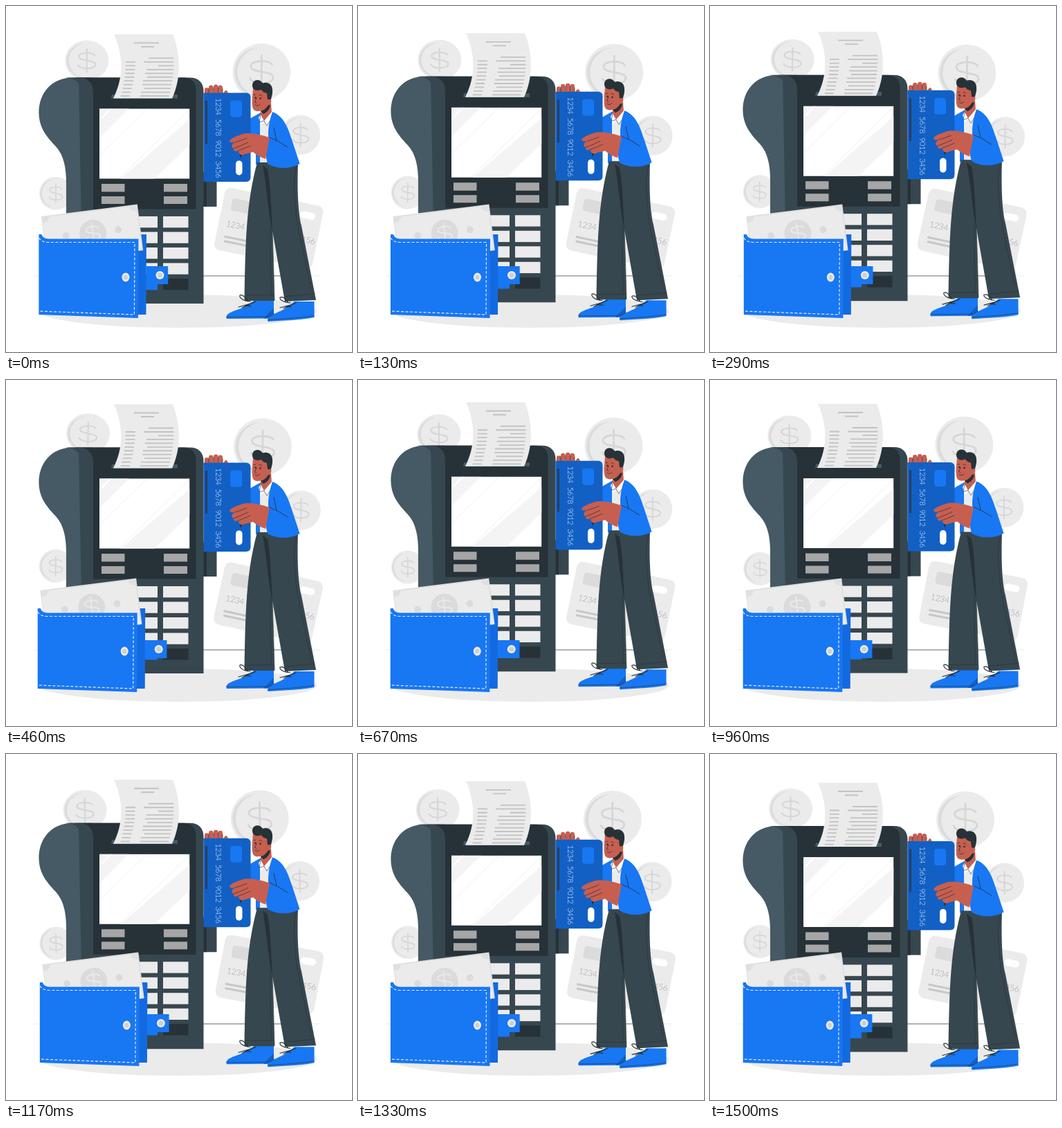
An HTML page that plays this animation: 500 px wide and 500 px high, repeating every 1.54 s.

```html
<!DOCTYPE html>
<html lang="en">
<head>
<meta charset="utf-8">
<title>Card payment</title>
<style>
  html, body { margin: 0; width: 100%; height: 100%; overflow: hidden; background: #fff; }
  svg { display: block; width: 100%; height: 100%; }
  text { font: 300 11px Lato, sans-serif; letter-spacing: -.3px; word-spacing: 3.2px; }
  .wide { font-size: 12px; letter-spacing: -.2px; word-spacing: 4.5px; }
  .pale { fill: #ebebeb; }
  .shade { fill: #dbdbdb; }
  .slate { fill: #37474f; }
  .dark { fill: #263238; }
  .blue { fill: #1877f2; }
  .deep { fill: #1260c4; }
  .skin { fill: #c75f50; }
  .ink { fill: none; stroke: #263238; stroke-linecap: round; stroke-linejoin: round; }
</style>
</head>
<body>
<svg viewBox="0 0 500 500">
  <defs>
    <path id="dollar" d="M11-7C10-13-11-13-11-6C-11 2 12-2 12 6C12 14-11 14-12 6M0-18V18" fill="none" stroke="#d6d6d6" stroke-width="2"/>
    <g id="coin">
      <circle r="30" class="pale"/>
      <path class="shade" d="M-2-26A26 26 0 0 0-2 26A26.2 26.2 0 0 1-2-26"/>
      <use href="#dollar"/>
    </g>
    <clipPath id="glass"><path d="M135 148.5H265.200V249.500H135Z"/></clipPath>
  </defs>

  <g id="backdrop">
    <use href="#coin" transform="translate(116.500 79) scale(1.05 .97)"/>
    <use href="#coin" transform="translate(369 95) scale(1.4 1.37)"/>
    <use href="#coin" transform="translate(425.500 186) scale(.95)"/>
    <use href="#coin" transform="translate(72 271) scale(.8)"/>
    <g transform="translate(318 261) rotate(11.500)">
      <rect width="145" height="92" rx="9" class="pale"/>
      <rect x="13" y="14" width="29" height="18" rx="4" class="shade"/>
      <rect x="113" y="12" width="22" height="10" rx="5" fill="#fff"/>
      <text x="11" y="56" class="wide" fill="#a0a0a0">1234 5678 9012 3456</text>
      <path d="M12 71H49M13 77.500H47" stroke="#c7c7c7" stroke-width="3"/>
    </g>
  </g>

  <path d="M40 390H455" stroke="#ebebeb"/>
  <path d="M285 390H440" stroke="#757575" stroke-width="1.200"/>
  <ellipse cx="249" cy="441" rx="200" ry="24" class="pale"/>

  <g id="scene">
    <!-- terminal -->
    <path class="slate" d="M285 240H304.500V290H285Z"/>
    <path class="dark" d="M285 240H290V290H285Z"/>
    <path fill="#455a64" d="M125 103.500H95C66 104 47 126 47.500 155C48 178 61 191 72 203C84 216 87 235 87 255V430H125Z"/>
    <path class="slate" d="M105 103.500H266C278 103.500 285.500 111 285.500 123V430H111Z"/>
    <path class="dark" d="M100 103.500H257C268 103.500 274.500 110 274.500 121V293.500H126V140Z"/>
    <path class="slate" d="M85 103.500C104 104 111 115 111 135V430H126V125C126 112 119 103.500 105 103.500Z"/>
    <g clip-path="url(#glass)">
      <path fill="#fff" d="M135 148H266V250H135Z"/>
      <path fill="#f4f4f4" d="M135 148H178L135 191ZM266 163V200L214 250H165Z"/>
      <path d="M152 148L134 166" stroke="#fff" stroke-width="2"/>
      <path d="M266 149L163 250M204 148L135 216" stroke="#ededed" stroke-width=".8"/>
    </g>
    <path fill="#a6a6a6" d="M138 257h33.500v11.500h-33.500zM138 275h33.500v11h-33.500zM228 257h34v11.500h-34zM228 275h34v11h-34z"/>
    <g id="keys"></g>
    <path fill="#455a64" d="M153 128H248V133.500H152Z"/>
    <path class="pale" d="M156 41H241C252 68 254 104 240 133.500H155C170 104 170 72 156 41Z"/>
    <path id="print" stroke="#c2c2c2" stroke-width="1.800"/>

    <!-- fingers behind the card -->
    <g class="skin">
      <rect x="287" y="118" width="6" height="14" rx="3"/>
      <rect x="293" y="114.500" width="6.500" height="16" rx="3.200"/>
      <rect x="300" y="113.500" width="6.500" height="16" rx="3.200"/>
      <rect x="306.500" y="114.500" width="6.500" height="16" rx="3.200"/>
      <path d="M312 128L317 122Q320 121 321 127Z"/>
    </g>
    <path class="ink" stroke-width=".7" d="M293 125V119M299.800 125V118M306.500 125V118M313 125V120"/>

    <!-- left sleeve, neck, shirt -->
    <path class="blue" d="M368 154L352 163V184L361 190V229H369Z"/>
    <path class="pale" d="M367 157L382 152L388 172L381 229H367Z"/>
    <path class="skin" d="M368 148L383 140L384 155L373 167L368 158Z"/>
    <path fill="#fafafa" d="M368 157L373 166L384 153L387 160L377 173L373 167L368 173L365 161Z"/>
    <path class="ink" stroke-width=".6" d="M368 157L366 168L373 166L377 173L386 159"/>

    <!-- head -->
    <path class="skin" d="M357 119C356 132 354 146 358 150C362 154 371 152 376 147L378 143C384 142 386 134 379 133L377 120Z"/>
    <path class="dark" d="M357 119C354 112 358 107 363 107C367 107 369 109 371 111.500C378 109 385 113 385 121C385.500 127 384 130 383 135L378 135L377 126Q371 125 369 121Q361 124 357 119Z"/>
    <path class="dark" d="M368 152Q375 150 379 143L382 143Q381 152 372 156Z"/>
    <circle cx="360.500" cy="132.500" r="1.300" class="dark"/>
    <circle cx="367.500" cy="133.500" r="1.300" class="dark"/>
    <path class="ink" stroke-width=".8" d="M358 128.500L361 128M366 128.500Q369 128 370 130M362 133L359.500 139L362 140M360 143Q364 146 367 142"/>

    <!-- trousers and shoes -->
    <path class="blue" d="M318.500 451C317 443 331 441 342 436L360 425H387V447Q386 451 376 451.500L319 452Z"/>
    <path class="deep" d="M372 451.500L387 436V447Q386 451 376 451.500Z"/>
    <path class="blue" d="M378 455C377 447 392 444 402 438L417 427H445.500V450Q430 453 402 454.500L379 456Z"/>
    <path class="ink" stroke-width=".6" d="M319 449.500L376 449Q384 449 387 444M379 453.500Q425 451 445 447.500"/>
    <path class="slate" d="M363 226H422C421 255 421 295 427 318L448 425L403 427L385 325L388 426L344.500 426C346 340 347 285 363 226Z"/>
    <path class="dark" d="M371 230L378 236C382 255 383 285 385 325C379 300 378 270 371 230Z"/>
    <path class="ink" stroke-width=".6" d="M385 325Q387 380 388 425M345 418H387M402 420L446 416M420 232C414 242 417 295 423 325L441 410M383 418L382 320"/>
    <path class="ink" stroke-width="1.200" d="M353 427C342 427 337 421 338 418C342 416 346 421 350 427M336 435L357 429M341 436L361 427M345 433L354 434M411 429C400 428 395 424 396 421C401 419 405 424 408 429M396 436L415 431M401 437L419 429M404 434L412 435"/>

    <!-- card -->
    <path class="deep" d="M285.500 125.500H347Q353.500 126 353.500 132V247.500Q353.500 254 347 254H285.500Z"/>
    <path fill="#263f63" d="M288 137H291V199H288Z"/>
    <rect x="324" y="136.500" width="17" height="24" rx="4" class="blue"/>
    <rect x="332" y="223.500" width="9.500" height="21" rx="4.700" fill="#fff"/>
    <text transform="translate(302.500 133.300) rotate(90)" fill="#e8eefc">1234 5678 9012 3456</text>
    <path class="dark" d="M337 211L342 213L339 220Z"/>

    <!-- jacket, right arm and hand -->
    <path class="blue" d="M385 153C402 159 408 178 413 193L424.500 228C410 236 392 236 378 228L376 220Q374 205 379 190Q378 172 385 153Z"/>
    <path class="skin" d="M381 190C368 186 352 182 342 185C332 188 323 192 323 195.500Q324 198 331 197C325 200 325 204 329 206C328 209 331 211 336 209C336 214 340 217 345 214L357 211Q365 218 375 221Z"/>
    <path class="ink" stroke-width=".7" d="M331 197Q341 194 348 191M329 206Q340 202 350 197M336 209Q345 206 353 202"/>
    <path class="ink" stroke-width=".8" d="M381 190Q394 195 407 204M387 176L391 194"/>
  </g>

  <g id="wallet">
    <path fill="#136ae0" d="M186 330H203.500L203 446H186Z"/>
    <path class="blue" d="M203 376H234.700V402H203Z"/>
    <circle cx="223" cy="389" r="6" class="pale"/>
    <circle cx="223" cy="389" r="3.500" fill="#cfcfcf"/>
    <g transform="translate(51.500 304) rotate(-7.200)">
      <path fill="#e0e0e0" d="M0 0H140V67H0Z"/>
      <path class="pale" d="M1 10Q10 10 11 2H128Q129 10 138 10V66H1Z"/>
      <circle cx="71" cy="33.500" r="19.500" class="shade"/>
      <circle cx="32" cy="32" r="5" class="shade"/>
      <circle cx="108" cy="33" r="5" class="shade"/>
      <use href="#dollar" transform="translate(71 33.500) scale(.85)" style="filter:brightness(1.100)"/>
    </g>
    <path class="blue" d="M48 330H52Q54 336 62 336.500H192L191.500 451L48 446Z"/>
    <path d="M48 335Q52 341.500 62 341.500H186.500L186 446L48 441" fill="none" stroke="#dfeafc" stroke-width="1.200" stroke-dasharray="4 2.500"/>
    <ellipse cx="173.500" cy="392" rx="5.500" ry="6.500" class="pale"/>
    <ellipse cx="173.500" cy="392" rx="3" ry="3.500" fill="#cfcfcf"/>
  </g>
</svg>
<script>
const $ = id => document.getElementById(id);

const key = (x, y, w, cls) => `<rect x="${x}" y="${y}" width="${w}" height="16.300" class="${cls}"/>`;
$('keys').innerHTML = [0, 1, 2, 3, 4].map(i => {
  const y = 304 + 22.500 * i, last = i === 4;
  return key(183, y, 36, last ? 'blue' : 'pale') + key(227, y, 36.500, last ? 'dark' : 'pale');
}).join('');

let print = 'M185 53.500H221M195 59H214M206 75.500H242';
[199, 220, 203, 201, 204, 198, 197, 200, 195, 194].forEach((start, i) => {
  const y = 81 + 5.450 * i, bend = i * i * .09;
  print += `M${173 - bend} ${y}h${14 - i * .1}M${start} ${y}H${242.500 - bend}`;
});
$('print').setAttribute('d', print);

const LOOP = 1540, LEAD = 40;

// Linear interpolation through evenly spaced values
function tween(values, p) {
  const x = p * (values.length - 1), i = Math.floor(x);
  return values[i] + (values[i + 1] - values[i]) * (x - i);
}

function draw(now) {
  const p = (now + LEAD) % LOOP / LOOP;
  const move = (id, value) => $(id).setAttribute('transform', value);
  move('scene', `translate(0 ${.5 + tween([0, -10, 0], p)})`);
  move('backdrop', `rotate(${tween([0, 1, 0, -1, 0], p)} 250 250)`);
  move('wallet', `translate(${tween([0, -1, 2, -4, 4, -4, 4, -4, 2, -1, 0], p) - .3} 0)`);
  requestAnimationFrame(draw);
}
draw(performance.now());
</script>
</body>
</html>
```
